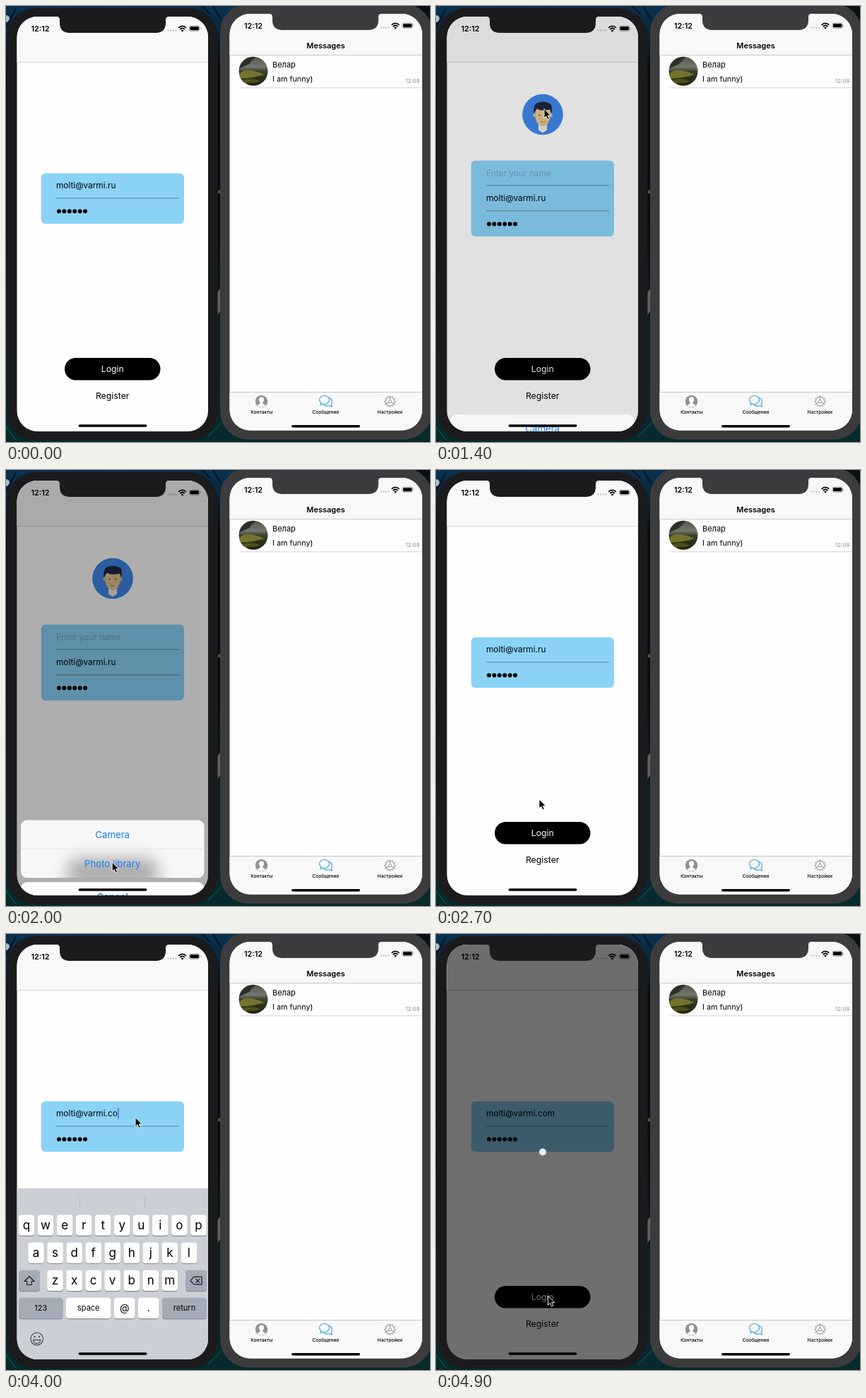
Animation, 600 px wide and 617 px high, one loop 5000 ms. Source, as an HTML page:

```html
<!DOCTYPE html>
<html lang="en">
<head>
<meta charset="utf-8">
<title>Login and messages</title>
<style>
  html, body { margin: 0; width: 100%; height: 100%; overflow: hidden; background: #07161c; }
  svg { display: block; width: 100vw; height: 100vh; font-family: Inter, "Open Sans", sans-serif; }
  .mid { text-anchor: middle; }
  .bold { font-weight: 600; }
  .blue { fill: #147cec; }
  .blur { filter: blur(11px); }
</style>
</head>
<body>
<svg id="stage" viewBox="0 0 600 617" preserveAspectRatio="none">
  <defs>
    <clipPath id="leftScreen"><rect x="15.5" y="15" width="270.5" height="587" rx="29"/></clipPath>
    <clipPath id="rightScreen"><rect x="316.5" y="11" width="272.5" height="589.5" rx="29"/></clipPath>
    <clipPath id="formClip"><rect id="formClipBox" x="49.5" width="202.5" rx="7"/></clipPath>
    <clipPath id="photoClip"><circle cx="350" cy="92.3" r="20.5"/></clipPath>
    <clipPath id="faceClip"><circle r="29"/></clipPath>
    <clipPath id="panelClip"><rect x="21" y="449" width="259.5" height="82" rx="9"/></clipPath>
    <linearGradient id="desk" x2="0" y2="1">
      <stop offset="0" stop-color="#0a3252"/><stop offset=".06" stop-color="#08253c"/>
      <stop offset=".15" stop-color="#07090c"/><stop offset=".5" stop-color="#080c0e"/>
      <stop offset=".75" stop-color="#082226"/><stop offset="1" stop-color="#062a2c"/>
    </linearGradient>
    <linearGradient id="photo" x2="0" y2="1">
      <stop offset="0" stop-color="#50544e"/><stop offset=".35" stop-color="#73776f"/>
      <stop offset=".5" stop-color="#3b3f2a"/><stop offset="1" stop-color="#1c1e0f"/>
    </linearGradient>
    <g id="notch"><path d="M-80-1V0C-76 0-75 2-75 5V9C-75 18-70 23-61 23H61C70 23 75 18 75 9V5C75 2 76 0 80 0V-1Z"/></g>
    <g id="status">
      <text class="bold" y="21" x="20" font-size="10.8">12:12</text>
      <g fill="#b4b4b4"><circle cx="214" cy="19.5" r="1.1"/><circle cx="217.6" cy="19.5" r="1.1"/><circle cx="221.2" cy="19.5" r="1.1"/><circle cx="224.8" cy="19.5" r="1.1"/></g>
      <path d="M228.6 15.8Q234 10.8 239.4 15.8M230.7 18Q234 15 237.3 18" fill="none" stroke="#000" stroke-width="1.7"/>
      <path d="M232 19.6Q234 17.8 236 19.6L234 21.8Z"/>
      <rect x="244" y="13.3" width="14.3" height="7" rx="2" fill="none" stroke="#777" stroke-width=".7"/>
      <rect x="245" y="14.3" width="12.3" height="5" rx="1"/>
      <path d="M259.3 15.3q1.5 1.5 0 3z" fill="#777"/>
    </g>
  </defs>

  <rect width="600" height="617" fill="url(#desk)"/>
  <rect x="560" width="40" height="40" fill="#0a0f12"/>
  <circle cy="18" r="5" fill="#a9c0ce"/>
  <path d="M0 30L14 4M277 0L290 12M293 0L304 18" stroke="#05121e" stroke-width="2"/>
  <path d="M299 405l4-5v32l-4 6z" fill="#5c6465"/>
  <circle cx="302" cy="263" r="2.5" fill="#70513a"/>
  <path d="M0 596l14 18M285 610l20-20" stroke="#126460"/>

  <!-- messages phone -->
  <rect x="303" y="-3" width="300" height="616.5" rx="40" fill="#3c3c3e"/>
  <g clip-path="url(#rightScreen)">
    <rect x="316" y="10" width="274" height="592" fill="#fefefe"/>
    <rect x="316" y="10" width="274" height="59" fill="#f8f8f8"/>
    <path d="M316 69.5H590M316 546.5H590" stroke="#c6c6c9"/>
    <rect x="316" y="547" width="274" height="55" fill="#f8f8f8"/>
    <text class="mid bold" x="452.5" y="59.5" font-size="11">Messages</text>
    <g clip-path="url(#photoClip)">
      <rect x="329" y="71" width="42" height="43" fill="url(#photo)"/>
      <path d="M329 71H354L344 82L329 89Z" fill="#2b302a"/>
      <path d="M329 97Q337 89 347 91T366 97Q350 102 329 103Z" fill="#74732d"/>
      <path d="M333 105Q348 100 360 107Q348 110 333 109Z" fill="#4c4f1a"/>
    </g>
    <text x="377" y="86.5" font-size="11">Велар</text>
    <text x="377" y="106.5" font-size="10.8">I am funny)</text>
    <text x="585.5" y="109" font-size="8" text-anchor="end" fill="#8e8e93">12:09</text>
    <path d="M330 115.8H590" stroke="#d4d4d7"/>
    <g transform="translate(361.5 559.5)">
      <circle r="8.7" fill="#929292"/>
      <path d="M-5.8 6.5Q-5 4-2 3.2V1.5Q-3.6-.5-3.5-3Q-3.2-6.3 0-6.3T3.5-3Q3.6-.5 2 1.5V3.2Q5 4 5.8 6.5Q0 10-5.8 6.5Z" fill="#fff"/>
    </g>
    <g fill="#f8f8f8" stroke="#3b9ee2" stroke-width="1.1" stroke-linejoin="round">
      <path d="M453 554.5C460 553 463 558 460.5 563L461.5 567L457.5 565.5C454 567 450 565.5 449 562"/>
      <path d="M445 564.5L445.8 561.5C441 557 445 551.5 450 551.5C455 551.5 458 554.5 457.5 558C457 562 451.5 564 448 563Z"/>
    </g>
    <g id="gear" transform="translate(543.5 559.5)" fill="none" stroke="#969696">
      <circle r="6.3"/><circle r="2"/>
    </g>
    <g class="mid" font-size="6.6" font-weight="500">
      <text x="361.8" y="577">Контакты</text><text x="452.3" y="577">Сообщения</text><text x="543.2" y="577">Настройки</text>
    </g>
    <use href="#status" x="317" y="11"/>
    <rect x="404" y="593" width="97" height="3.5" rx="1.75"/>
  </g>
  <use href="#notch" x="452" y="11" fill="#3c3c3e"/>

  <!-- login phone -->
  <rect x="1.5" y="3" width="298" height="611.5" rx="41" fill="#1b1b1d"/>
  <g clip-path="url(#leftScreen)">
    <rect x="15" y="15" width="272" height="588" fill="#fefefe"/>
    <rect x="15" y="15" width="272" height="64" fill="#f8f8f8"/>
    <path d="M15 79.5H287" stroke="#d2d2d4"/>
    <g id="avatar" clip-path="url(#faceClip)">
      <circle r="29" fill="#3f88ea"/>
      <path d="M-6 11H6V22L0 26L-6 22Z" fill="#f1eadf"/>
      <circle cx="-11" cy="1" r="2.8" fill="#dcb684"/><circle cx="11" cy="1" r="2.8" fill="#dcb684"/>
      <path d="M-10.5-8H10.5V4Q9 15 0 17Q-9 15-10.5 4Z" fill="#e6c48f"/>
      <path d="M-12.5-2Q-14-15-6-17Q4-20 11-15Q14-11 12.5-2L10-7Q-2-4-8-8Z" fill="#1d2840"/>
      <circle cx="-4.5" cy="1" r="1.1" fill="#4a3a30"/><circle cx="4.5" cy="1" r="1.1" fill="#4a3a30"/>
      <path d="M-3 10Q0 12 3 10" fill="none" stroke="#a9724e"/>
    </g>
    <g clip-path="url(#formClip)">
      <rect id="form" x="49.5" width="202.5" fill="#8ad3f7"/>
      <text id="hint" x="71" font-size="11.8" fill="#70a8c4">Enter your name</text>
      <path id="nameLine" d="M71 0H245" stroke="#5c8194"/>
      <g id="fields">
        <text id="email" x="71" y="21.8" font-size="11.8"></text>
        <path d="M71 35.5H245" stroke="#5c8194"/>
        <g id="dots"></g>
      </g>
      <rect id="caret" y="246" width="1.3" height="15.5" fill="#3b5fd0"/>
    </g>
    <rect x="83" y="498" width="135.5" height="31.5" rx="15.7"/>
    <text class="mid" x="150.7" y="518" font-size="12.2" fill="#fff">Login</text>
    <text class="mid" x="150.7" y="555.5" font-size="12.3">Register</text>
    <use href="#status" x="15.5" y="15"/>
    <rect id="dim" x="15" y="15" width="272" height="588"/>
    <g id="sheet">
      <g clip-path="url(#panelClip)">
        <rect x="21" y="449" width="260" height="82" fill="#f7f7f8"/>
        <rect class="blur" x="86" y="503" width="130" height="40" rx="18" opacity=".3"/>
        <path d="M21 489.5H281" stroke="#e4e4e6"/>
      </g>
      <rect x="21" y="537" width="259.5" height="41" rx="9" fill="#fefefe"/>
      <g class="mid blue" font-size="13.2">
        <text x="150.7" y="474.3">Camera</text><text x="150.7" y="515.5">Photo library</text>
        <text class="bold" x="150.7" y="562.5">Cancel</text>
      </g>
    </g>
    <g id="keyboard">
      <rect x="15" y="360" width="272" height="250" fill="#cccfd5"/>
      <path d="M104.5 371V388M196.5 371V388" stroke="#b9bcc2"/>
      <g id="keys"></g>
      <g fill="none" stroke="#1c1c1e" stroke-width="1.2" stroke-linejoin="round">
        <path d="M33 484.5L40 491.5H36.3V496.5H29.7V491.5H26Z"/>
        <path d="M261 490.5L266 485.2H277V495.8H266ZM268.5 488L274 493.5M274 488L268.5 493.5"/>
      </g>
      <g fill="none" stroke="#505357" stroke-width="1.3">
        <circle cx="43.7" cy="573" r="8.8"/><path d="M38.5 574.5H48.9Q48 579.5 43.7 579.5T38.5 574.5Z"/>
      </g>
      <circle cx="40.5" cy="570" r="1.3" fill="#505357"/><circle cx="46.9" cy="570" r="1.3" fill="#505357"/>
    </g>
    <rect x="102.5" y="592.3" width="97" height="3.5" rx="1.75"/>
    <g id="loading">
      <rect x="15" y="15" width="272" height="588" opacity=".56"/>
      <circle id="ball" cx="151" cy="308.5" fill="#e9eef0"/>
    </g>
  </g>
  <use href="#notch" x="151" y="15" fill="#1b1b1d"/>
  <path id="cursor" d="M0 0V13L3 10.3L5 15L7.3 14L5.3 9.5H9.3Z" fill="#000" stroke="#fff" stroke-width=".9"/>
</svg>
<script>
const LOOP = 5000;
const $ = id => document.getElementById(id);
const set = (id, attrs) => { for (const k in attrs) $(id).setAttribute(k, attrs[k]); };
const move = (id, x, y) => set(id, { transform: `translate(${x} ${y})` });

// eased 0..1 between two times
const ramp = (t, a, b) => {
  const u = Math.min(1, Math.max(0, (t - a) / (b - a)));
  return u * u * (3 - 2 * u);
};
// rises at one time, falls back at another
const pulse = (t, up, upEnd, down, downEnd) => ramp(t, up, upEnd) - ramp(t, down, downEnd);

// time, x, y
const trail = [
  [250, 210, 618], [750, 156, 543.5], [1050, 156, 543.5], [1300, 153, 145.5], [1620, 153, 145.5],
  [1860, 150, 556], [1960, 150, 556], [2150, 152, 548], [2420, 152, 548], [2700, 146, 466],
  [3050, 183, 259.5], [4200, 183, 259.5], [4560, 158.5, 512], [5000, 158.5, 512]
];

// time at which each address ending appears
const base = "molti@varmi.";
const typed = [[0, "ru"], [3480, "r"], [3600, ""], [3780, "c"], [3920, "co"], [4060, "com"]];

function key(x, y, w, label, size = 17, dark = false) {
  const fill = dark ? "#a5abb7" : "#fefefe";
  return `<rect x="${x}" y="${y + 1}" width="${w}" height="29.5" rx="4" fill="#898c92"/>` +
    `<rect x="${x}" y="${y}" width="${w}" height="29.3" rx="4" fill="${fill}"/>` +
    `<text class="mid" x="${x + w / 2}" y="${y + 14.5 + size * .34}" font-size="${size}">${label}</text>`;
}

function buildKeys() {
  const rows = [["qwertyuiop", 29], ["asdfghjkl", 42.5], ["zxcvbnm", 69.5]];
  let out = "";
  rows.forEach(([letters, first], r) => [...letters].forEach((c, i) => {
    out += key(first + i * 27.05 - 11.3, 397.5 + r * 39.1, 22.6, c);
  }));
  out += key(18, 475.7, 30, "", 11, true) + key(254, 475.7, 30, "", 11, true);
  out += key(18, 514.7, 62.5, "123", 11, true) + key(85, 514.7, 63.5, "space", 11);
  out += key(153, 514.7, 29.5, "@", 14) + key(187, 514.7, 29.5, ".", 14);
  out += key(221, 514.7, 63, "return", 11, true);
  $("keys").innerHTML = out;
}

function buildSmallParts() {
  for (let i = 0; i < 6; i++) {
    $("dots").innerHTML += `<circle cx="${75 + i * 7.4}" cy="54" r="3"/>`;
  }
  let spokes = "";
  for (let a = 0; a < 360; a += 30) {
    const inner = a % 120 ? "" : "M0-2V-6";
    spokes += `<path d="M0-6.5V-8.5${inner}" transform="rotate(${a})"/>`;
  }
  $("gear").innerHTML += spokes;
}

function drawForm(t) {
  const p = pulse(t, 865, 1165, 2250, 2550);
  const top = 236.5 - 18 * p, row = 36 * p, box = { y: top, height: 72 + row };
  set("form", box);
  set("formClipBox", box);
  move("avatar", 151, top - 65);
  set("avatar", { opacity: p });
  set("hint", { y: top + row - 14, opacity: Math.max(0, p * 2 - 1) });
  set("nameLine", { transform: `translate(0 ${top + row - .5})`, opacity: Math.min(1, p * 3) });
  move("fields", 0, top + row);

  const ending = typed.filter(([at]) => at <= t).pop()[1];
  const email = $("email");
  if (email.textContent !== base + ending) email.textContent = base + ending;
  const editing = t >= 3150 && t < 4300;
  set("caret", { x: 71.5 + email.getComputedTextLength(), opacity: editing ? 1 : 0 });
}

function drawOverlays(t) {
  const sheet = pulse(t, 1320, 1560, 1920, 2160);
  set("dim", { opacity: .43 * sheet });
  move("sheet", 0, 175 * (1 - sheet));
  move("keyboard", 0, 245 * (1 - pulse(t, 3150, 3430, 4250, 4520)));
  set("loading", { opacity: ramp(t, 4740, 4890) });
  set("ball", { r: 5 * ramp(t, 4780, 4900) });
}

function drawCursor(t) {
  const i = trail.findIndex(k => k[0] > t);
  set("cursor", { visibility: i === 0 ? "hidden" : "visible" });
  if (i < 1) return;
  const [t0, x0, y0] = trail[i - 1], [t1, x1, y1] = trail[i];
  const u = ramp(t, t0, t1);
  move("cursor", x0 + (x1 - x0) * u, y0 + (y1 - y0) * u);
}

function draw(t) {
  drawForm(t);
  drawOverlays(t);
  drawCursor(t);
}

buildKeys();
buildSmallParts();
draw(0);
const start = performance.now();
function tick() {
  draw((performance.now() - start) % LOOP);
  requestAnimationFrame(tick);
}
requestAnimationFrame(tick);
</script>
</body>
</html>
```
